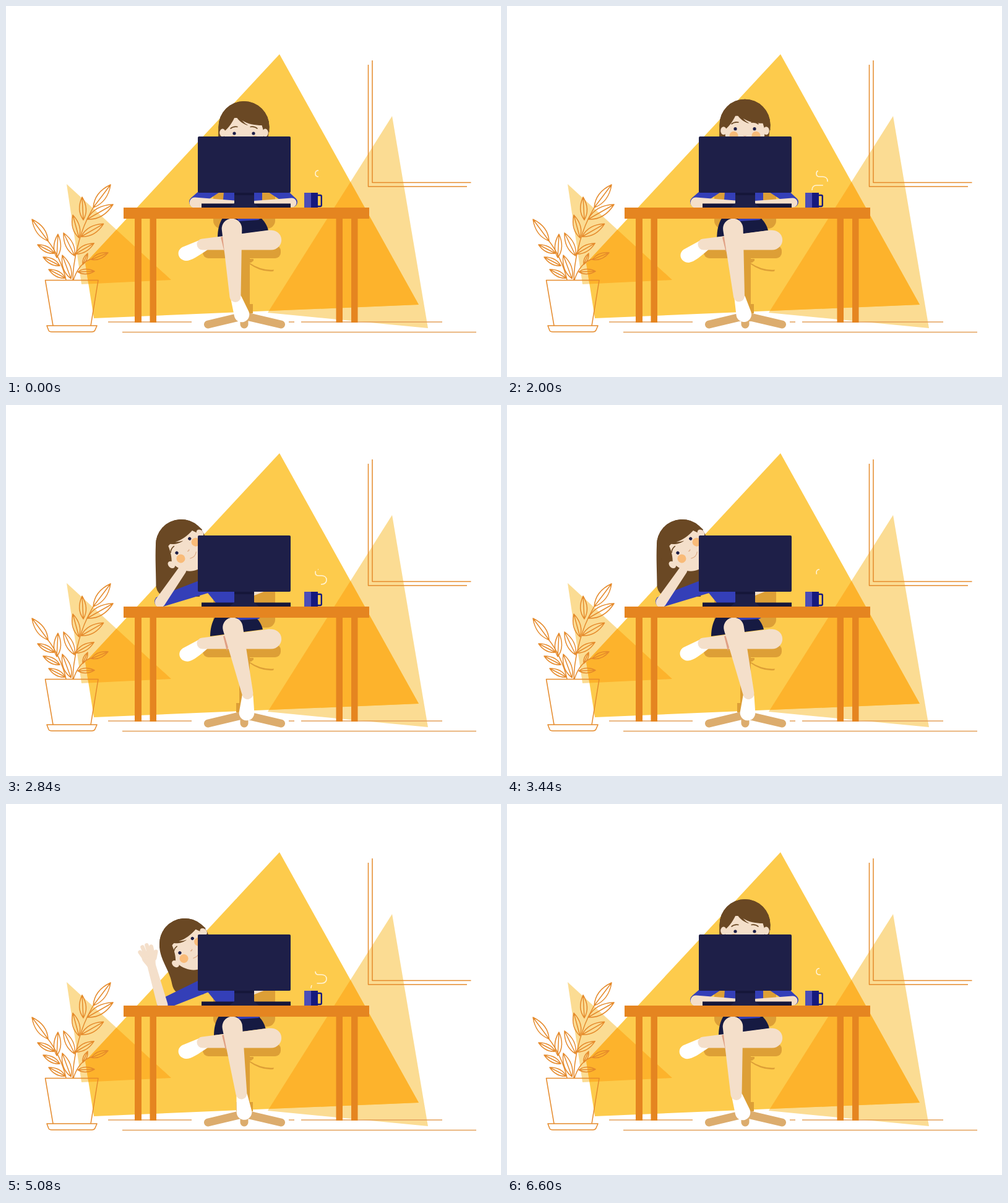
Recreate the animation shown at these times as an HTML page. Size 800 px wide and 600 px high, loop 6640 ms.

```html
<!DOCTYPE html>
<html lang="en">
<head>
<meta charset="utf-8">
<title>At the desk</title>
<style>
html, body { margin: 0; width: 100%; height: 100%; overflow: hidden; background: #fff; }
svg { display: block; width: 800px; height: 600px; }
.line { fill: none; stroke: #e58a2b; stroke-width: 1.5; stroke-linejoin: round; }
.thin { fill: none; stroke: #e3a05a; stroke-width: 1.3; }
.skin { fill: #f4dfca; }
.blue { fill: #343fb8; }
.hair { fill: #6a4824; }
.navy { fill: #1e1f48; }
.ink { fill: #15163a; }
.desk { fill: #e58520; }
.seat { fill: #dd9f36; }
.steam { fill: none; stroke: #fff3d6; stroke-width: 1.6; }
</style>
</head>
<body>
<svg viewBox="0 0 800 600">
  <defs><clipPath id="bigClip"><path d="M442 78L667 483L142 505L128 416Z"/></clipPath></defs>

  <g fill="#fbdc93">
    <path d="M98 288L267 443L122 450Z"/>
    <path d="M624 178L682 521L423 496Z"/>
  </g>
  <path fill="#fdcb4c" d="M442 78L667 483L142 505L128 416Z"/>
  <g fill="#fdb32c" clip-path="url(#bigClip)">
    <path d="M98 288L267 443L122 450Z"/>
    <path d="M624 178L682 521L423 496Z"/>
  </g>
  <path class="line" d="M585.5 95V292H745M592 88V285.5H751.5"/>
  <path class="thin" d="M165 511H300M457 511H466M477 511H705M188 527.5H760"/>

  <g class="line">
    <path d="M63.5 443.5H149L137 517H76ZM66 517H147L143.5 525Q142 527 139 527H74Q70 527 69 525Z"/>
    <path d="M108 443C108 415 118 372 131 345Q137 333 141 326M97 443C92 420 80 395 67 379M109 443C115 424 126 412 139 409"/>
    <path id="leaves"/>
  </g>

  <!-- chair -->
  <rect class="seat" x="335" y="270" width="100" height="90" rx="13"/>
  <path class="seat" d="M377 400H394V482H399V497H372V482H377ZM393 409H400V412L396 415H393ZM393 415Q412 428 433 426.5L432 429Q412 431 393 417Z"/>
  <rect class="seat" x="318" y="387" width="126" height="21" rx="9"/>
  <path fill="none" stroke="#dcac6d" stroke-width="13" stroke-linecap="round" d="M385 501L326.5 515M385 501L444.5 515M385 501V515"/>

  <!-- legs -->
  <path id="shorts" fill="#161a42"/>
  <path class="blue" d="M373 343H412L408 346L376 348Z"/>
  <path id="toe" fill="#fff" d="M312 379L285 390C274 396 278 411 291 412C300 412 311 404 326 394Z"/>
  <path class="skin" d="M317 376.5L421 363C445 359 450 380 441 389Q436 394.5 428 394.5H318A9 9 0 0 1 317 376.5Z"/>
  <path id="shade" fill="#e0a084"/>
  <path id="sole" fill="#fff"/>
  <path id="shin" class="skin"/>

  <!-- upper body -->
  <path id="longHair" class="hair"/>
  <path id="torso" class="blue"/>
  <path id="sleeveR" class="blue"/>
  <path id="forearmR" class="skin"/>
  <path id="sleeveL" class="blue"/>
  <g id="head">
    <circle class="hair" r="41"/>
    <path class="skin" d="M-32 -14V12C-32 34 -17 49 -1 49C16 49 32 34 32 12V-14Z"/>
    <g id="face">
      <g fill="#f9bb78"><circle cx="-18" cy="11" r="7"/><circle cx="18" cy="11" r="7"/></g>
      <path fill="none" stroke="#d9a37c" d="M-2 11Q0 13 2 11M-8 22Q0 27 7 22"/>
      <g class="navy"><circle cx="-15.5" r="2.6"/><circle cx="15.5" r="2.6"/></g>
      <path fill="none" stroke="#6a4824" stroke-width="1.6" d="M-22 -7.5Q-17 -12 -10 -10.5M10 -10.5Q17 -12 22 -7.5"/>
    </g>
    <path class="hair" d="M-41 9V0A41 41 0 0 1 41 0V9L32 8L29 -2C18 -2 6 -4 -3 -10Q1 -5 7 -2C0 -3 -9 -9 -13.5 -18C-18 -8 -24 2 -32 8Z"/>
    <g class="skin"><ellipse cx="-34.5" cy="10" rx="4.8" ry="6.5"/><ellipse cx="34.5" cy="10" rx="4.8" ry="6.5"/></g>
  </g>
  <path id="forearmL" class="skin"/>
  <g id="hand" class="skin">
    <path id="palm"/>
    <path fill="none" stroke="#f4dfca" stroke-width="6.5" stroke-linecap="round" d="M-8 -13L-12 -24M-4 -15L-6 -31M2 -15L1.5 -32M7 -14L8 -28M8 -8L13 -18"/>
  </g>

  <!-- desk -->
  <rect class="ink" x="316" y="319.5" width="144" height="7"/>
  <path class="navy" d="M369 300H401V319L409 326H361L369 319Z"/>
  <rect class="ink" x="369" y="300" width="32" height="6"/>
  <rect class="navy" x="310" y="211" width="150" height="91" rx="2"/>
  <path id="steam0" class="steam"/>
  <path id="steam1" class="steam"/>
  <rect x="502" y="306" width="7.8" height="18" rx="2" fill="none" stroke="#15197e" stroke-width="2.4"/>
  <rect x="482" y="302" width="11" height="24" fill="#4b4db8"/>
  <rect x="493" y="302" width="11" height="24" fill="#15197e"/>
  <path class="desk" d="M190 326H587V344H190ZM208 343H219V512H208ZM232.5 343H243V512H232.5ZM533.5 343H544V512H533.5ZM558 343H568.5V512H558Z"/>
</svg>
<script>
const LOOP = 6640, TAP = LOOP / 13, STEAM_LOOP = LOOP / 2, STEAM_LENGTH = 65;
const el = {};
document.querySelectorAll('[id]').forEach(node => el[node.id] = node);
const set = (id, d) => el[id].setAttribute('d', d);
const move = (id, value) => el[id].setAttribute('transform', value);

const easeIn = u => u * u;
const easeOut = u => u * (2 - u);
const easeBoth = u => u < .5 ? 4 * u ** 3 : 1 - 4 * (1 - u) ** 3;
const smooth = u => u * u * (3 - 2 * u);
const ramp = (t, from, to, ease = smooth) => ease(Math.min(1, Math.max(0, (t - from) / (to - from))));

// Outline around two circles
function taper(x1, y1, r1, x2, y2, r2) {
  const axis = Math.atan2(y2 - y1, x2 - x1);
  const spread = Math.acos((r1 - r2) / Math.hypot(x2 - x1, y2 - y1));
  const at = (x, y, r, a) => `${x + r * Math.cos(a)} ${y + r * Math.sin(a)}`;
  const up = axis + spread, down = axis - spread;
  return `M${at(x1, y1, r1, up)}L${at(x2, y2, r2, up)}A${r2} ${r2} 0 ${+(r2 > r1)} 0 ${at(x2, y2, r2, down)}` +
    `L${at(x1, y1, r1, down)}A${r1} ${r1} 0 ${+(r1 > r2)} 0 ${at(x1, y1, r1, up)}Z`;
}

function leaf(x, y, dx, dy) {
  const side = w => `${dx * .45 - dy * w} ${dy * .45 + dx * w}`;
  return `M${x} ${y}q${side(.29)} ${dx} ${dy}q${dx * -.55 - dy * -.29} ${dy * -.55 + dx * -.29} ${-dx} ${-dy}l${dx} ${dy}`;
}

function drawLeaves() {
  let d = leaf(141, 326, 28, -37) + leaf(68, 380, -26, -35) + leaf(124, 418, 8, -18);
  for (let i = 0; i < 3; i++) {
    const size = 1 - .14 * i;
    d += leaf(131 - 9.5 * i, 345 + 28 * i, 42 * size, -24 * size);
    d += leaf(125 - 7 * i, 346 + 29 * i, -2 - 8 * i, -37);
    d += leaf(78 + 9 * i, 400 + 20 * i, -27, -14);
  }
  for (let i = 0; i < 2; i++) {
    d += leaf(82 + 23 * i, 407 + 34 * i, 2 - 16 * i, -38);
    d += leaf(138 - 22 * i, 410 + 20 * i, 27, -11 + 10 * i);
  }
  set('leaves', d);
}

function drawSteam(t) {
  const phase = (t + STEAM_LOOP - 680) % STEAM_LOOP + 680;
  for (let i = 0; i < 2; i++) {
    const puff = el['steam' + i], time = phase - 1000 * i;
    const tail = STEAM_LENGTH * ramp(time, 1600, 3000, easeOut);
    const head = STEAM_LENGTH * ramp(time, 700, 2300, easeOut);
    puff.style.display = head > tail ? '' : 'none';
    puff.setAttribute('stroke-dasharray', `0 ${tail} ${head - tail} 100`);
  }
}

function drawLegs(t) {
  const turn = ramp(t, 1850, 2340) - ramp(t, 4850, 5310);
  const ankleX = 370.5 + 20 * turn, ankleY = 470 - 3 * turn;
  const left = 342 - 12 * turn, right = 424 - 9 * turn;
  set('shorts', `M${left + 8} 343C${left + 2} 352 ${left} 364 ${left} 374L${right} 363C${right - 2} 354 ${right - 8} 346 ${right - 12} 343Z`);
  set('shade', `M${347 + 4 * turn} 374l6 24l9 -28Z`);
  set('shin', taper(365 + 1.5 * turn, 360, 16.3, ankleX, ankleY, 9));
  set('sole', taper(ankleX + 2 - 2 * turn, ankleY + 4, 9, 381 + 8 * turn, 499 - turn, 12.3));

  const hold = t > 2.5 * TAP && t < 4.5 * TAP;
  const tap = hold ? 1 : (1 - Math.cos(2 * Math.PI * t / TAP)) / 2;
  move('toe', `rotate(${-6.5 * tap} 318 386)`);
}

function drawHead(t, lean, slump, wave) {
  const low = 1 - ramp(t, 1100, 1520) + ramp(t, 5850, 6450);
  const x = 384.5 - 70 * lean - 31.5 * slump + 6 * wave;
  const y = 191.7 + 14.3 * lean + 20 * slump + 3.3 * low;
  move('head', `translate(${x} ${y}) rotate(${-25 * lean - 23 * slump - wave})`);
  move('face', `translate(${-5 * lean + 6 * slump - 2 * wave} ${7 - 4.4 * lean + slump + 4 * low})`);

  const left = x - 41, tipX = left + 2.5 * lean - 2 * slump + 20 * wave;
  const tipY = 284 - 17 * lean + 27 * slump - 2 * wave;
  set('longHair', `M${left} ${y}C${left - 1} ${y + 25} ${left + .8 * (tipX - left)} ${tipY - 25} ${tipX} ${tipY}` +
    `q3 14 16 16H${x + 30}L${x + 41} ${y}Z`);
}

function drawArms(t, lean, slump, wave) {
  set('torso', `M${350 - 6 * lean} 326L${353 - 40 * lean} 288H${414 - 45 * lean}L${414 - 16 * lean} 326Z`);

  const rightX = 463 - 23 * lean - 15 * slump, rightY = 317 - 20 * lean - 7 * slump;
  set('sleeveR', taper(426 - 55 * lean, 288, 12, rightX, rightY, 8));
  set('forearmR', taper(rightX - 1, rightY + 1, 7.5, 402 - 4 * lean - 3 * slump, 320 - 9 * lean - 6 * slump, 5));

  const elbowX = 305 - 53 * lean - 3 * slump + 4 * wave;
  const elbowY = 317 - 16 * lean + 17 * slump + 6 * wave;
  const sway = -10 * Math.cos(2 * Math.PI * (t - 4000) / 480);
  const angle = 93 + 6 * lean - 64 * slump + (sway - 51) * wave;
  const reach = 63 + 21 * lean - 22 * slump + 5 * wave;
  const turn = angle * Math.PI / 180;
  const wristX = elbowX + reach * Math.sin(turn), wristY = elbowY - reach * Math.cos(turn);
  set('sleeveL', taper(343 - 18 * lean, 288 + 4 * slump, 12, elbowX, elbowY, 9));
  set('forearmL', taper(elbowX, elbowY + 1, 8.5, wristX, wristY, 5.8 + lean));
  el.hand.style.display = wave > .02 ? '' : 'none';
  move('hand', `translate(${wristX} ${wristY}) rotate(${angle}) scale(${wave})`);
}

function draw(t) {
  // She leans out, slumps onto her hand, waves, then returns to work.
  const away = 1 - ramp(t, 5060, 5640, easeBoth);
  const lean = away * ramp(t, 2040, 2360, easeIn);
  const slump = away * ramp(t, 2360, 2720, easeOut);
  const wave = away * ramp(t, 3460, 3840);
  drawSteam(t);
  drawLegs(t);
  drawHead(t, lean, slump, wave);
  drawArms(t, lean, slump, wave);
}

drawLeaves();
set('palm', taper(0, 0, 7, -1, -12, 11));
for (const id of ['steam0', 'steam1']) {
  set(id, 'M493 298C493 293 496 290 500 290H510C516 290 518 286 518 283C518 278 514 276 510 276H505C501 276 500 273 500 271C500 268 502 266 505 266');
  el[id].setAttribute('pathLength', STEAM_LENGTH);
}

const start = performance.now();
function tick(now) {
  draw(Math.max(0, now - start) % LOOP);
  requestAnimationFrame(tick);
}
draw(0);
requestAnimationFrame(tick);
</script>
</body>
</html>
```
